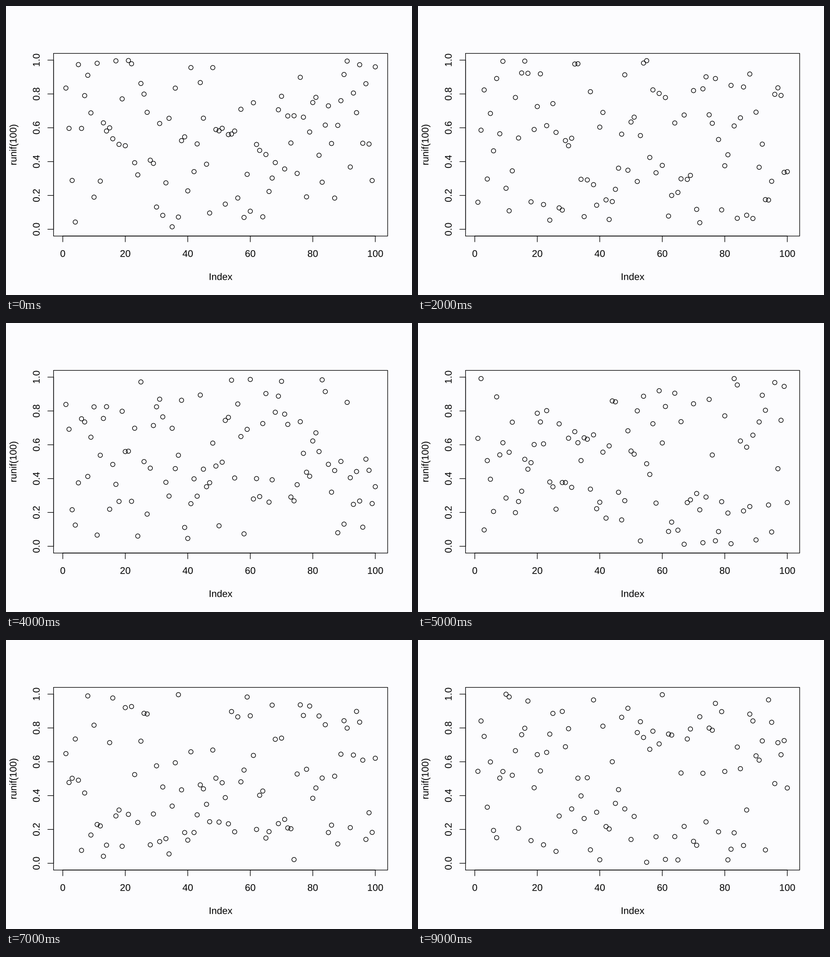
A matplotlib script that plays this animation: 885x632 px, repeating every 10 s.

```python
import numpy as np
import matplotlib.pyplot as plt
from matplotlib.animation import FuncAnimation
from matplotlib.patches import PathPatch, Rectangle
from matplotlib.textpath import TextPath
from matplotlib.transforms import Affine2D

W, H, DPI = 885, 632, 64
LINE = 25.27                      # height of one margin line in pixels
FONT = LINE / 1.2
STROKE = FONT / 16
RADIUS = 0.225 * FONT
COUNT, FRAMES, STEP = 100, 10, 1000
SEED = 100

LEFT, RIGHT = 4.1 * LINE, W - 2.1 * LINE
TOP, BOTTOM = 4.1 * LINE, H - 5.1 * LINE

plt.rcParams["font.family"] = "Liberation Sans"


def pt(px):
    return px * 72 / DPI


def scale(v, lo, hi, start, end):
    """Map lo..hi to start..end with a 4 % margin on both sides."""
    pad = 0.04 * (hi - lo)
    return start + (v - lo + pad) / (hi - lo + 2 * pad) * (end - start)


def x_px(v):
    return scale(v, 1, COUNT, LEFT, RIGHT)


def y_px(v):
    return scale(v, 0, 1, BOTTOM, TOP)


fig = plt.figure(figsize=(W / DPI, H / DPI), dpi=DPI, facecolor="#fcfcfe")
ax = fig.add_axes([0, 0, 1, 1])
ax.set_xlim(0, W)
ax.set_ylim(H, 0)
ax.axis("off")


def stroke(xs, ys):
    ax.plot(xs, ys, color="black", lw=pt(STROKE), snap=False,
            solid_capstyle="round")


def glyphs(text):
    return TextPath((0, 0), text, size=FONT)


def advance(text):
    """Width of the text including its side bearings."""
    return glyphs(text + "|").get_extents().x1 - glyphs("|").get_extents().x1


def label(x, y, text, angle=0):
    """Centre text on its advance width, with its baseline through (x, y)."""
    place = (Affine2D().translate(-advance(text) / 2, 0).scale(1, -1)
             .rotate_deg(-angle).translate(x, y))
    ax.add_patch(PathPatch(glyphs(text), fc="black", lw=0, snap=False,
                           transform=place + ax.transData))


ax.add_patch(Rectangle((LEFT, TOP), RIGHT - LEFT, BOTTOM - TOP, fill=False,
                       ec="black", lw=pt(STROKE), snap=False,
                       joinstyle="round"))

# Axis lines lie on top of the box, between the first and last tick.
stroke([x_px(0), x_px(100)], [BOTTOM, BOTTOM])
stroke([LEFT, LEFT], [y_px(0), y_px(1)])

for v in range(0, 101, 20):
    x, y = x_px(v), y_px(v / 100)
    stroke([x, x], [BOTTOM, BOTTOM + LINE / 2])
    stroke([LEFT - LINE / 2, LEFT], [y, y])
    label(x, BOTTOM + 1.8 * LINE, str(v))
    label(LEFT - 1.2 * LINE, y, f"{v / 100:.1f}", 90)

label((LEFT + RIGHT) / 2, BOTTOM + 3.8 * LINE, "Index")
label(LEFT - 3.2 * LINE, (TOP + BOTTOM) / 2, "runif(100)", 90)

xs = x_px(np.arange(1, COUNT + 1))
dots = ax.scatter(xs, xs, s=pt(2 * RADIUS) ** 2, facecolors="none",
                  edgecolors="black", linewidths=pt(STROKE), snap=False)


def update(i):
    values = np.random.default_rng(SEED + i).random(COUNT)
    dots.set_offsets(np.column_stack([xs, y_px(values)]))
    return (dots,)


anim = FuncAnimation(fig, update, frames=FRAMES, interval=STEP,
                     init_func=lambda: update(0), repeat=True,
                     repeat_delay=0)
plt.show()
```
